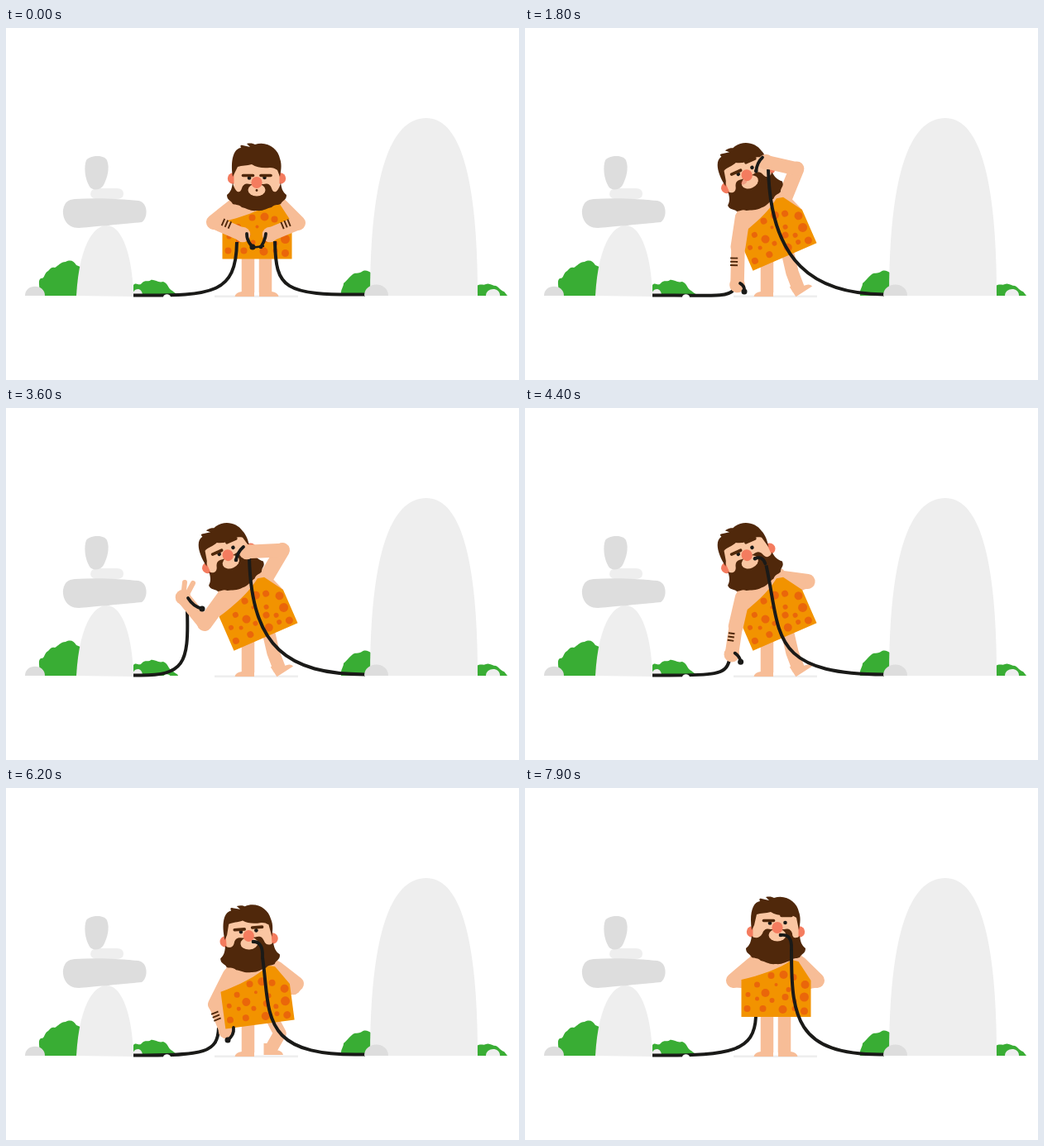
Write an HTML page that moves like this. It is 620 by 426 pixels and loops after 8 s.

```html
<!DOCTYPE html>
<html lang="en">
<head>
<meta charset="utf-8">
<title>Caveman and cables</title>
<style>
  html, body { margin: 0; width: 100%; height: 100%; overflow: hidden; background: #fff; }
  svg { display: block; width: 620px; height: 426px; }
</style>
</head>
<body>
<svg viewBox="0 0 620 426">
  <g fill="#39ad34">
    <path d="M41 324C41 312 38 306 42 303C47 304 46 296 51 294C54 290 56 289 59 290C63 288 66 283 72 283C78 280 82 282 85 287L92 290V324Z"/>
    <path d="M154 324V311C158 307 160 313 164 309C168 304 172 308 175 305C180 304 184 309 190 307C196 309 196 316 201 318C204 321 208 322 208 324Z"/>
    <path d="M405 324C404 316 408 314 408 309C412 306 414 302 418 299C422 295 426 298 430 295C434 292 438 294 442 297V324Z"/>
    <path d="M569 324V312C574 309 577 312 580 310C584 308 588 312 592 312C596 314 598 318 602 319L606 324Z"/>
  </g>
  <g fill="#eee">
    <path d="M85 324C88 270 103 239 122 239C140 239 153 275 154 325Z"/>
    <path d="M110 194H134Q142 194 142 201Q142 207 132 207H110Q102 206 102 201Q102 195 110 194Z"/>
    <path d="M153 324C153 314 165 313 165 324Z"/>
    <path d="M580 324C580 314 597 313 597 324Z"/>
    <path d="M440 324C440 200 458 109 508 109C554 109 570 200 570 324Z"/>
    <rect x="252" y="323.5" width="101" height="2.6"/>
  </g>
  <g fill="#ddd">
    <path d="M83 207C110 205 140 207 160 209C172 211 172 230 164 235C145 237 100 241 88 242C72 242 68 228 69 220C71 210 75 208 83 207Z"/>
    <path d="M97 160C102 154 118 153 122 160C126 170 122 182 118 190C114 197 104 197 101 192C95 182 94 168 97 160Z"/>
    <path d="M23 324C23 309 47 309 47 324Z"/>
  </g>
  <g id="actor"></g>
  <path d="M190 326C190 321 199 321 199 326Z" fill="#fff"/>
  <path d="M433 324C433 306 462 306 462 324Z" fill="#ddd"/>
</svg>
<script>
const SKIN = '#f7bd97', FACE = '#fac6a2', HAIR = '#50280b', CORAL = '#f47c5f', CABLE = '#1a1a18';
const LOOP = 8000, STEP = 100;

// Arms: elbow, hand, wristband side. Cables: two controls, end. Tips: start, control, end.
// Mouth: opacity of the closed lips and of the tongue.
const stand = {
  body: [303.5, 279.5, 0], head: [303, 180, 0], face: [0, 7], brow: [0], mouth: [1, 0], fingers: [0],
  leg: [313.5, 270, 313.5, 295, 313.5, 320, 0],
  armL: [251, 235, 286, 250, -1], armR: [353, 236, 319, 250, 1],
  cableL: [250, 324, 278, 322, 279, 259], tipL: [291, 249, 291, 258, 298, 265],
  cableR: [335, 324, 326, 315, 325, 258], tipR: [314, 249, 313, 258, 308, 265]
};
const reach = {
  body: [314, 277, -23.5], head: [269, 180, -24], face: [0, -2], brow: [1], mouth: [0, 1], fingers: [0],
  leg: [317, 270, 323, 296, 331, 317, -33],
  armL: [257.5, 265, 256.5, 311, 1], armR: [312.5, 166, 291.5, 128, 0],
  cableL: [235, 324, 246, 325, 252, 317], tipL: [260, 309, 266, 312, 265, 319],
  cableR: [372, 322, 296, 262, 294, 138], tipR: [287, 124, 282, 130, 283, 142]
};
const bite = { ...reach, mouth: [0, 0], armR: [334, 172, 291, 174, 0],
  cableR: [340, 322, 297, 290, 294, 182], tipR: [287, 168, 280, 174, 278, 184] };
const lift = { ...bite, fingers: [1], armL: [240, 261, 214, 229, 0],
  cableL: [215, 324, 221, 310, 219, 246], tipL: [220, 230, 226, 240, 237, 243] };
const bend = { ...bite, armR: [343, 217, 338, 220, 0],
  cableR: [285, 322, 312, 270, 291, 192], tipR: [291, 192, 288, 179, 278, 182] };
const rise = {
  body: [307, 286, -7.5], head: [293.5, 182, -4], face: [0, -3], brow: [.2], mouth: [0, 0], fingers: [0],
  leg: [321, 278, 331, 297, 319, 318, 0],
  armL: [253, 262, 266, 294, 1], armR: [351, 237, 347, 241, 0],
  cableL: [240, 324, 256, 320, 257, 290], tipL: [275, 290, 276, 299, 268, 305],
  cableR: [305, 326, 320, 275, 310, 205], tipR: [310, 205, 311, 186, 299, 186]
};
const proud = {
  ...stand, body: [303.5, 277, 0], head: [303, 172, 0], face: [2, -3], brow: [1], mouth: [0, 0],
  armL: [252, 233, 266, 234, 0], armR: [353, 233, 341, 235, 0],
  cableL: [250, 324, 277, 318, 279, 277],
  cableR: [325, 324, 322, 275, 322, 195], tipR: [322, 195, 323, 176, 309, 178]
};
const timeline = [
  [0, stand], [300, stand], [900, reach], [1400, reach], [2000, bite], [2800, bite], [3500, lift],
  [3800, lift], [4600, bend], [5600, bend], [6200, rise], [6900, proud], [LOOP, proud]
];

function poseAt(t) {
  const i = timeline.findIndex(([end]) => end > t);
  const [t0, a] = timeline[i - 1], [t1, b] = timeline[i];
  const u = (t - t0) / (t1 - t0), k = u * u * (3 - 2 * u), pose = {};
  for (const key in a) pose[key] = a[key].map((v, j) => v + (b[key][j] - v) * k);
  return pose;
}

const shape = (d, fill) => `<path d="${d}" fill="${fill}"/>`;
const line = (d, color, width, cap = 'round') =>
  `<path d="${d}" fill="none" stroke="${color}" stroke-width="${width}" stroke-linecap="${cap}" stroke-linejoin="round"/>`;
const dot = (x, y, r, fill, ry = r) => `<ellipse cx="${x}" cy="${y}" rx="${r}" ry="${ry}" fill="${fill}"/>`;
const fade = (opacity, content) => `<g opacity="${opacity}">${content}</g>`;
const place = ([x, y, turn], content) => `<g transform="translate(${x} ${y}) rotate(${turn})">${content}</g>`;

function attach([x, y, turn], px, py) {
  const a = turn * Math.PI / 180, c = Math.cos(a), s = Math.sin(a);
  return [x + px * c - py * s, y + px * s + py * c];
}

const upperArm = (shoulder, [ex, ey]) => line(`M${shoulder}L${ex} ${ey}`, SKIN, 18);

function forearm([ex, ey, hx, hy, side]) {
  const dx = hx - ex, dy = hy - ey, len = Math.hypot(dx, dy) || 1;
  let svg = line(`M${ex} ${ey}L${hx} ${hy}`, SKIN, 16.5) + dot(hx, hy, 9.3, SKIN);
  if (Math.abs(side) > .05) {
    for (const offset of [-4.3, 0, 4.3]) {
      const k = (len * .39 + offset) / len, x = ex + dx * k, y = ey + dy * k, span = 9 * side / len;
      svg += line(`M${x} ${y}L${x - dy * span} ${y + dx * span}`, HAIR, 1.9, 'butt');
    }
  }
  return svg;
}

const cable = (x, y, c) => line(`M${x} ${y}L${x + (x < 300 ? 6 : 0)} ${y}C${c}`, CABLE, 4, 'butt');
const tip = ([x, y, cx, cy, ex, ey], ball) =>
  line(`M${x} ${y}Q${cx} ${cy} ${ex} ${ey}`, CABLE, 3.8) + dot(ex, ey, ball, CABLE);

const spots = [
  [-23, -39, 3.5], [-6, -50, 4], [9, -51, 5], [21, -48, 4], [35, -39, 5], [-34, -27, 3], [-13, -29, 5],
  [0, -39, 2], [15, -33, 3], [34, -24, 5.5], [-23, -22, 2.5], [-5, -20, 3], [11, -24, 4], [22, -19, 3],
  [-35, -10, 4], [-16, -10, 4], [8, -9, 5], [22, -10, 3], [34, -7, 4.5]
];
const torso = shape('M-42 -44L-30 -77H30L42 -44L30 -20H-40Z', SKIN);
const dress = shape('M-42 0V-45C-20 -50 4 -58 19 -69L27 -67L42 -44V0Z', '#f29300') +
  spots.map(([x, y, r]) => dot(x, y, r, '#ea660a')).join('');

const foot = dir => shape(`M${-7.5 * dir} -9V5H${16 * dir}Q${15 * dir} 0 ${7.5 * dir} -1V-9Z`, SKIN);

function legs([hx, hy, kx, ky, ax, ay, turn]) {
  return line('M292.5 268V320', SKIN, 15.5, 'butt') + place([292.5, 320, 0], foot(-1)) +
    line(`M${hx} ${hy}L${kx} ${ky}L${ax} ${ay}`, SKIN, 15.5, 'butt') + place([ax, ay, turn], foot(1));
}

function head({ head, face: [fx, fy], brow, mouth }) {
  const fringe = (fy - 7) * .7, lip = fy + 2;
  const skin = shape('M-27.5 -20Q-27 -30 0 -30Q27 -30 27.5 -20V15Q28 26 0 26Q-28 26 -27.5 15Z', FACE);
  const hair = shape(`M-29 0C-32 -20 -28 -34 -19 -35C-20 -37 -20 -39 -17 -38L-8 -36L-12 -40
    C-7 -41 -4 -40 -2 -39C12 -44 26 -34 28 -22C31 -14 29 -6 28 0L25 ${-8 + fringe}
    C22 ${-10 + fringe} 20 ${-11 + fringe} 16 ${-11 + fringe}C8 ${-10 + fringe} 0 ${-11 + fringe} -6 ${-15 + fringe}
    C-12 ${-13 + fringe} -18 ${-14 + fringe} -23 ${-12 + fringe}L-26 -6Z`, HAIR);
  const beard = shape(`M-29 7C-30 14 -31 18 -36 22C-36 29 -31 28 -29 33C-24 35 -22 33 -18 37C-12 38 -8 42 0 41
    C8 42 12 38 18 37C22 33 24 35 29 33C31 28 36 29 36 22C31 18 30 14 29 7
    C26 ${lip + 11} 20 ${lip + 12} ${18 + fx} ${lip + 5}C${16 + fx} ${lip - 1} ${12 + fx} ${lip - 1} ${8 + fx} ${lip}
    H${-8 + fx}C${-12 + fx} ${lip - 1} ${-16 + fx} ${lip - 1} ${-18 + fx} ${lip + 5}C-20 ${lip + 12} -26 ${lip + 11} -29 7Z`, HAIR);
  const browLine = (x, y) => line(`M${x - 6} ${y}H${x + 6}`, HAIR, 3.6);
  return place(head,
    dot(-28.5, 2, 6.7, CORAL) + dot(28.5, 2, 6.7, CORAL) + skin + hair + beard +
    dot(fx, fy + 9, 10.5, FACE, 7.5) +
    fade(mouth[0], dot(fx, fy + 9.5, 1.4, HAIR)) +
    fade(mouth[1], dot(fx - 7, fy + 6, 4, '#d8332a', 2.6)) +
    dot(fx - 9, fy - 5.5, 2.3, CABLE) + dot(fx + 9.5, fy - 6, 2.3, CABLE) +
    browLine(fx - 10.5, fy - 8.5) + browLine(fx + 11, fy - 8.5 - 6 * brow[0]) +
    dot(fx, fy, 6.6, CORAL, 7));
}

function draw(t) {
  const p = poseAt(t);
  if (t > 7000) p.head[1] += .8 * Math.sin((t - 7900) / 900 * Math.PI * 2);
  const leftHidden = t >= 6000, rightHidden = t >= 4300;
  const leftInFront = (t > 600 && t < 3000) || (t > 4200 && t < 6000);
  const shoulderL = attach(p.body, -28, -64), shoulderR = attach(p.body, 28, -65);
  const upperL = upperArm(shoulderL, p.armL);
  const [hx, hy] = p.armL.slice(2), v = p.fingers[0];
  const fingers = v > .05 ? line(`M${hx} ${hy}l${2 * v} ${-18 * v}M${hx + 3} ${hy}l${9 * v} ${-17 * v}`, SKIN, 6) : '';
  const left = cable(154, 323.4, p.cableL);
  const right = cable(434, 322.4, p.cableR);
  const spark = t >= 800 && t < 1500 ? dot(284, 144.5, 1.8, '#f8c630') : '';

  document.getElementById('actor').innerHTML = [
    legs(p.leg),
    leftHidden ? left + upperL + forearm(p.armL) : leftInFront ? '' : upperL,
    upperArm(shoulderR, p.armR),
    rightHidden ? forearm(p.armR) : '',
    place(p.body, torso + dress),
    leftHidden ? '' : left + (leftInFront ? upperL : '') + fingers + forearm(p.armL),
    t < 6500 ? tip(p.tipL, 3.5) : '',
    head(p),
    right,
    rightHidden ? '' : forearm(p.armR),
    tip(p.tipR, 2.3),
    spark,
    t < 400 ? line('M296 266L311 264', CABLE, 2.4) : ''
  ].join('');
}

const start = performance.now();
function tick(now) {
  const t = Math.max(0, now - start) % LOOP;
  draw(Math.floor(t / STEP) * STEP);
  requestAnimationFrame(tick);
}
draw(0);
requestAnimationFrame(tick);
</script>
</body>
</html>
```
